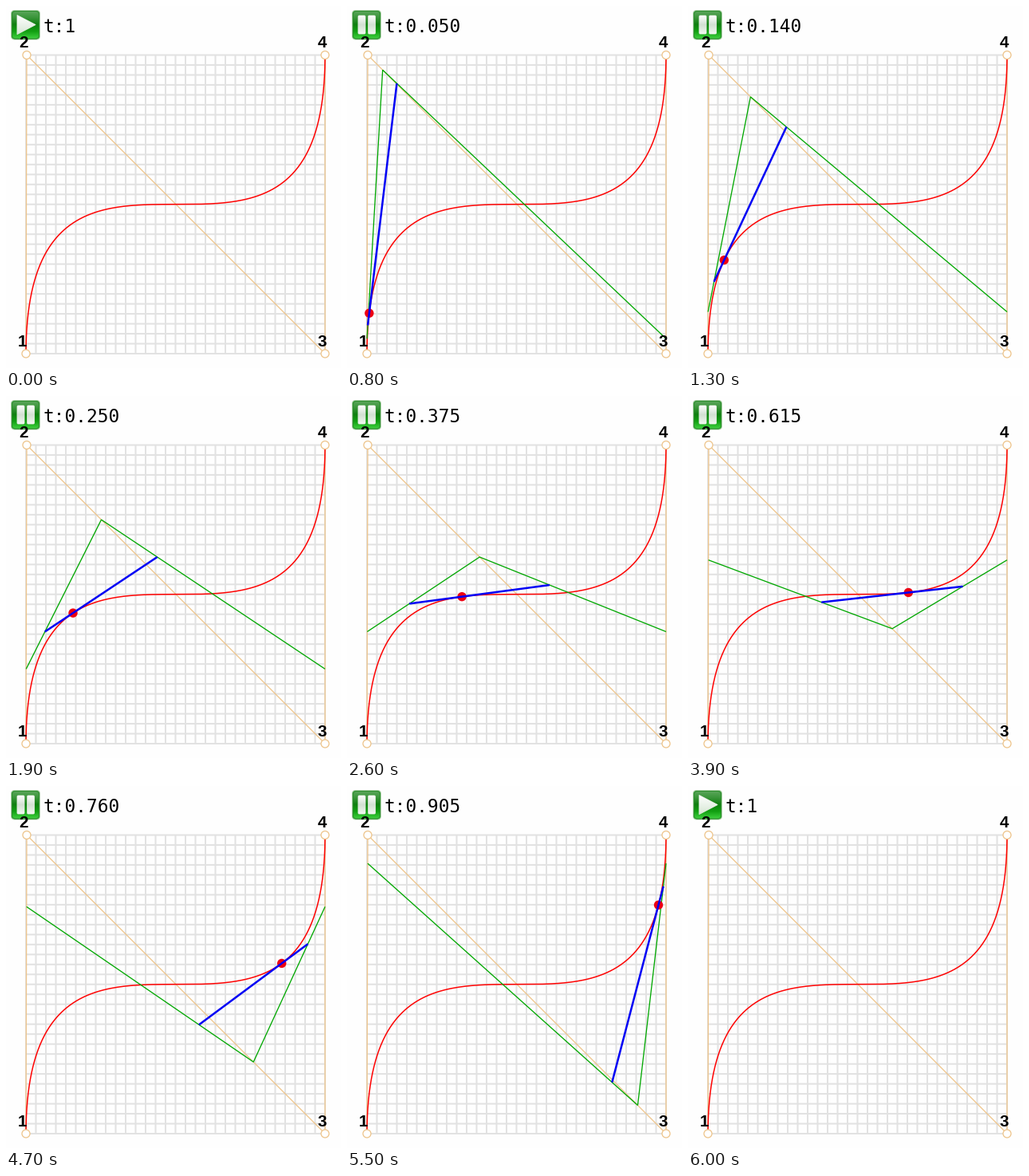
A matplotlib script that plays this animation: 420x454 px, repeating every 6.3 s.

```python
import numpy as np
import matplotlib.pyplot as plt
from matplotlib.animation import FuncAnimation
from matplotlib.colors import LinearSegmentedColormap
from matplotlib.patches import Circle, FancyBboxPatch, Polygon

W, H, DPI = 420, 454, 100
PX = 72 / DPI  # points per pixel
STEP_MS, FRAMES = 100, 63
RUN_START, RUN_END = 5, 60

SAND, RED, GREEN, BLUE = "#eec58c", "#ff0000", "#00a800", "#0000f5"
POINTS = np.array([(25, 436), (26, 61.5), (400, 436), (400, 61.5)], float)
LABELS = [("1", 20, 427), ("2", 22, 52), ("3", 396, 427), ("4", 396, 52)]

fig = plt.figure(figsize=(W / DPI, H / DPI), dpi=DPI, facecolor="#fefefe")
ax = fig.add_axes([0, 0, 1, 1])
ax.axis("off")


def line(pts, color, width, z):
    xs, ys = np.transpose(pts)
    return ax.plot(xs, ys, color=color, lw=width * PX, zorder=z, snap=False,
                   solid_capstyle="butt", solid_joinstyle="miter")[0]


def blend(pts, t):
    return pts[:-1] * (1 - t) + pts[1:] * t


def rounded(x, y, w, h, r, **style):
    box = FancyBboxPatch((x, y), w, h, **style,
                         boxstyle=f"round,pad=0,rounding_size={r}")
    return ax.add_patch(box)


def shade(patch, extent, colors, z):
    cmap = LinearSegmentedColormap.from_list("shade", colors)
    left, top, right, bottom = extent
    img = ax.imshow(np.linspace(0, 1, 64)[:, None], cmap=cmap, aspect="auto",
                    extent=(left, right, bottom, top), zorder=z,
                    interpolation="bilinear")
    img.set_clip_path(patch)
    return img


def draw_button():
    rounded(6, 5, 37, 37.5, 5, fc="#a9cfa6", ec="none", zorder=1)
    face = rounded(7, 6, 35, 35.5, 4.5, fc="#1d8f1d", ec="none", zorder=2)
    shade(face, (7, 6, 42, 41.5),
          ["#5fa85f", "#3c963c", "#0f7f0f", "#12a012", "#3fd03f"], 3)
    rounded(7.5, 6.5, 34, 34.5, 4.5, fc="none", ec="#2f8f2f", lw=PX, zorder=4)


def draw_play():
    tri = Polygon([(14, 11.5), (14, 35.5), (37, 23.5)], fc="#e9f1e8",
                  ec="#cfe3cd", lw=PX, joinstyle="round", zorder=5)
    ax.add_patch(tri)
    return [tri, shade(tri, (14, 11, 37, 36), ["#ffffff", "#d5e6d3"], 6)]


def draw_pause():
    parts = []
    for x in (14, 26.5):
        bar = rounded(x, 12, 9, 23, 1.5, fc="#e6efe5", ec="#c4dcc1",
                      lw=PX, zorder=5)
        parts += [bar, shade(bar, (x, 12, x + 9, 35),
                             ["#ffffff", "#d3e0d2", "#f0f7ef"], 6)]
    return parts


def draw_grid():
    (x0, y1), (x1, y0) = POINTS[0], POINTS[3]
    for x in np.linspace(x0, x1, 31):
        line([(x, y0), (x, y1)], "#e2e2e2", 2, 0)
    for y in np.linspace(y0, y1, 31):
        line([(x0, y), (x1, y)], "#e2e2e2", 2, 0)


def draw_curve():
    t = np.linspace(0, 1, 200)[:, None]
    a, b, c, d = POINTS
    s = 1 - t
    line(s**3 * a + 3 * s**2 * t * b + 3 * s * t**2 * c + t**3 * d,
         RED, 1.5, 8)


draw_grid()
draw_button()
line(POINTS, SAND, 1.3, 7)
draw_curve()
for p in POINTS:
    ax.add_patch(Circle(p, 5, fc="white", ec=SAND, lw=1.3 * PX, zorder=14))
for text, x, y in LABELS:
    ax.text(x, y, text, family="Liberation Sans", weight="bold",
            size=20.5 * PX, ha="center", va="baseline", zorder=15)

play, pause = draw_play(), draw_pause()
readout = ax.text(47, 33, "", family="DejaVu Sans Mono", size=22.7 * PX,
                  va="baseline", zorder=15)
outer = line(POINTS[:3], GREEN, 1.3, 9)
dot = ax.add_patch(Circle((0, 0), 5.7, fc="#ee0012", ec="none", zorder=10))
inner = line(POINTS[:2], BLUE, 2.5, 11)
moving = [outer, inner, dot]

ax.set_xlim(0, W)
ax.set_ylim(H, 0)


def progress(i):
    t = 0.14 + (i - 13) * 0.765 / 42
    return max(0.005, round(t / 0.005) * 0.005)


def update(i):
    running = RUN_START <= i < RUN_END
    for part in pause + moving:
        part.set_visible(running)
    for part in play:
        part.set_visible(not running)
    if running:
        t = progress(i)
        first = blend(POINTS, t)
        second = blend(first, t)
        outer.set_data(*first.T)
        inner.set_data(*second.T)
        dot.center = blend(second, t)[0]
        readout.set_text(f"t:{t:.3f}")
    else:
        readout.set_text("t:1")
    return moving + [readout]


anim = FuncAnimation(fig, update, frames=FRAMES, interval=STEP_MS,
                     repeat=True, repeat_delay=0, blit=False)
plt.show()
```
